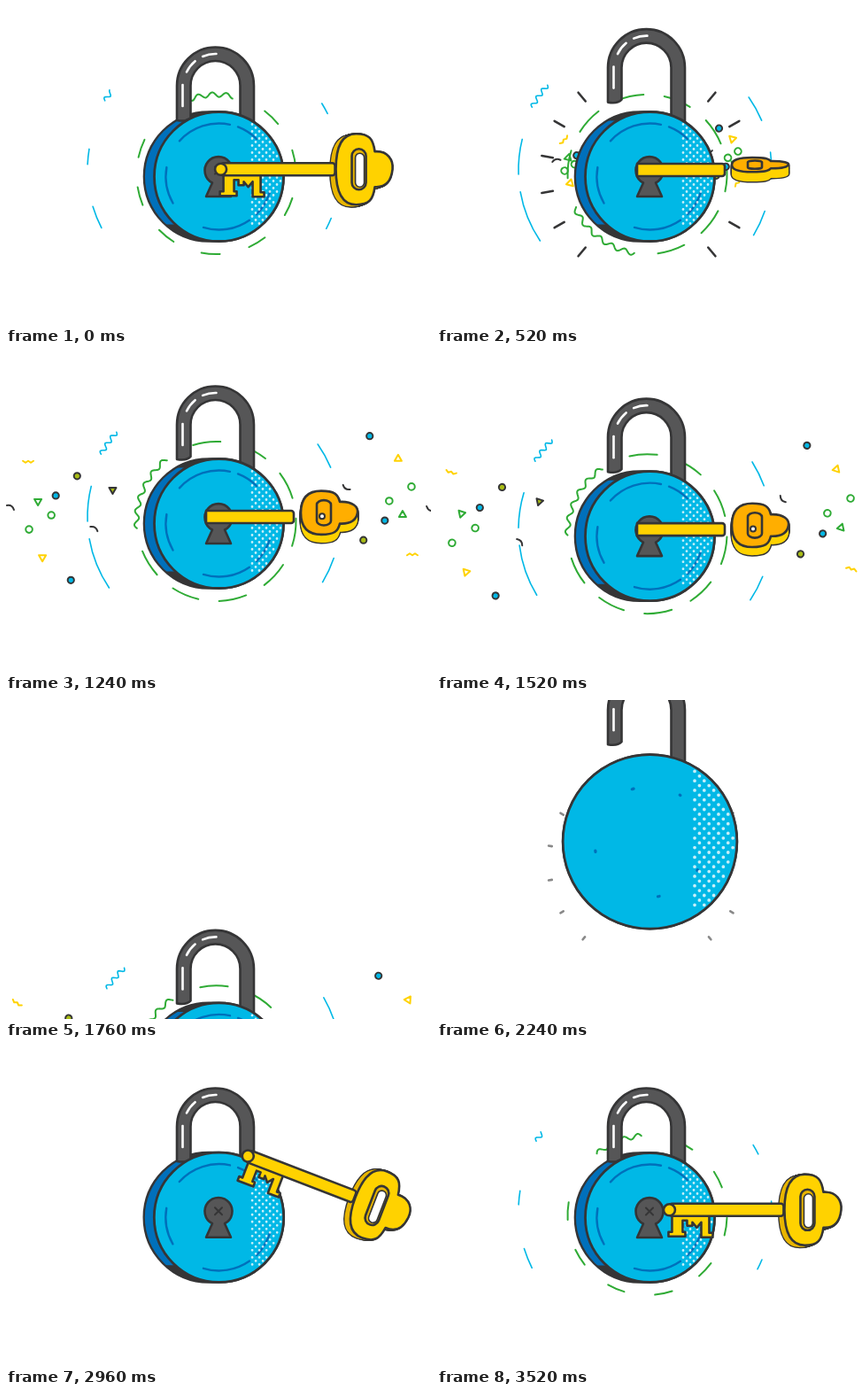
These frames come from a looping animation (480 by 360 pixels, 3.56 s). An HTML page with a canvas:

```html
<!DOCTYPE html>
<html>
<head>
<meta charset="utf-8">
<title>Padlock and key</title>
<style>
html, body { margin: 0; width: 100%; height: 100%; overflow: hidden; background: #fff; }
canvas { display: block; }
</style>
</head>
<body>
<canvas id="stage" width="480" height="360"></canvas>
<script>
const ctx = document.getElementById('stage').getContext('2d');
const LOOP = 3560, RAD = Math.PI / 180;
const INK = '#353536', STEEL = '#565657', CYAN = '#00b8e6', BLUE = '#0070bb';
const GREEN = '#2fab35', YELLOW = '#ffd200', SIDE = '#e8b500', ORANGE = '#ffae00', OLIVE = '#a9bd14';

const ramp = (t, from, to) => Math.min(1, Math.max(0, (t - from) / (to - from)));
const smooth = (t, from, to) => {
  const p = ramp(t, from, to);
  return p * p * (3 - 2 * p);
};

function paint(path, fill, line = INK, width = 2.6) {
  if (fill) { ctx.fillStyle = fill; ctx.fill(path); }
  if (line) { ctx.strokeStyle = line; ctx.lineWidth = width; ctx.stroke(path); }
}

function disc(x, y, r, fill, line, width) {
  const p = new Path2D();
  p.arc(x, y, r, 0, 7);
  paint(p, fill, line, width);
}

// Arc given by its middle and half its span, in degrees.
function dash(x, y, r, mid, half, color, width = 2) {
  const p = new Path2D();
  p.arc(x, y, r, (mid - half) * RAD, (mid + half) * RAD);
  paint(p, null, color, width);
}

function wave(x, y, r, mid, half, period, color, width = 2) {
  const p = new Path2D();
  for (let a = -half; a <= half; a += 0.5) {
    const d = r + 2.6 * Math.sin((a + half) / period * 2 * Math.PI);
    p.lineTo(x + d * Math.cos((mid + a) * RAD), y + d * Math.sin((mid + a) * RAD));
  }
  paint(p, null, color, width);
}

function rings(u) {
  const green = ramp(u, -300, 520) ** 0.4;
  if (green > 0) {
    const lead = 237 - 331 * Math.exp(-((Math.max(u + 40, 0) / 431) ** 1.275));
    for (let i = 0; i < 8; i++) dash(237.5, 190, 90, lead + 32 + 35 * i, 10 * green, GREEN);
    wave(237.5, 190, 90, lead - 28 * green, 28 * green, 10, GREEN);
  }
  const blue = ramp(u, -400, 520);
  if (blue > 0) {
    const drift = 5 * smooth(u, 1240, 1760);
    for (let i = -1; i < 2; i++) {
      dash(235, 185, 143, 27 * i - 2 + drift, 6 * blue, CYAN, 1.6);
      if (i < 1) dash(235, 185, 143, 186 + 28 * i + drift, (8 - 4 * i) * blue, CYAN, 1.6);
    }
    wave(235, 185, 146, -145 + drift, 6 * blue, 4, CYAN, 1.6);
  }
}

function ticks(age, cy, scale, color) {
  const p = ramp(age, 0, 280);
  if (p === 0 || p === 1) return;
  const inner = scale * (120 - 38 * (1 - p) ** 2), outer = inner + scale * 13 * Math.sin(Math.PI * p);
  const path = new Path2D();
  for (let a = 50; a <= 310; a += 20) {
    if (a === 70 || a === 90 || a === 110 || a === 250 || a === 270 || a === 290) continue;
    const c = Math.cos(a * RAD), s = Math.sin(a * RAD);
    path.moveTo(237 + inner * c, cy + inner * s);
    path.lineTo(237 + outer * c, cy + outer * s);
  }
  // The key side only has the two steeper pairs.
  for (const a of [-30, 30]) {
    const c = Math.cos(a * RAD), s = Math.sin(a * RAD);
    path.moveTo(237 + inner * c, cy + inner * s);
    path.lineTo(237 + outer * c, cy + outer * s);
  }
  paint(path, null, color);
}

// One half of the burst, around its centre; the other half is turned by 180 degrees.
const confetti = [
  ['squiggle', -216, -52, YELLOW], ['triangle', -205, -7, GREEN], ['triangle', -200, 56, YELLOW],
  ['triangle', -121, -20, INK], ['curl', -236, -1, INK], ['curl', -142, 23, INK],
  ['ring', -190, 8, GREEN], ['ring', -215, 24, GREEN],
  ['dot', -185, -14, CYAN], ['dot', -161, -36, OLIVE], ['dot', -168, 81, CYAN]
];
const shapes = {
  squiggle: new Path2D('M-6-1l3 2 3-2 3 2 3-2'),
  triangle: new Path2D('M-4-3H4L0 4Z'),
  curl: new Path2D('M-4-2Q2-3 4 3')
};

function burst(u) {
  const spread = 1.08 * (1 - 0.58 * Math.exp((520 - u) / 341));
  if (spread < 0) return;
  for (const side of [0, Math.PI]) for (const [kind, x, y, color] of confetti) {
    ctx.save();
    ctx.translate(242, 175);
    ctx.rotate(side);
    ctx.translate(x * spread, y * spread);
    ctx.rotate((u - 1240) / 900);
    if (kind === 'dot') disc(0, 0, 3.6, color, INK, 2);
    else if (kind === 'ring') disc(0, 0, 3.8, null, color, 2);
    else paint(shapes[kind], kind === 'triangle' && color === INK ? OLIVE : null, color, 2);
    ctx.restore();
  }
}

function shackle(up) {
  ctx.save();
  ctx.translate(0, -up);
  paint(new Path2D('M193 90a43.5 43.5 0 0 1 87 0V160H264.5V90a28 28 0 0 0-56 0V126Q204 131 193 129Z'), STEEL);
  paint(new Path2D('M199.5 89V113'), null, '#fff');
  for (const mid of [-142, -101]) dash(236.5, 90, 36, mid, 12.5, '#fff', 2.6);
  ctx.restore();
}

const halftone = new Path2D();
for (let col = 0; col < 10; col++) for (let row = 0; row < 15; row++) {
  const x = 37.5 + col * 4, y = -59 + row * 8 + col % 2 * 4;
  if (Math.hypot(x, y) < 70) {
    halftone.moveTo(x + 1.4, y);
    halftone.arc(x, y, 1.4, 0, 7);
  }
}

const keyhole = new Path2D('M-7 14A15.5 15.5 0 1 1 7 14L14 29.5H-14Z');
const cross = new Path2D('M-4-4L4 4M4-4L-4 4');

function lock(t, up) {
  const age = t - 2040, fresh = t > 1950;
  const scale = !fresh ? 1 : age < 0 ? 0 : 1 - Math.exp(-age / 190) * Math.cos(age * Math.PI / 200);
  const cy = 192.5 - 94 * (scale - 1), R = 73 * scale;
  const depth = fresh ? 11.5 * smooth(t, 2240, 2440) : 11.5;
  const hole = fresh ? smooth(t, 2260, 2480) : 1;
  const lines = fresh ? smooth(t, 2200, 2600) : 1;

  if (depth > 0) {
    const p = new Path2D();
    p.arc(240.5 - depth, cy, R, Math.PI / 2, -Math.PI / 2);
    p.arc(240.5, cy, R, -Math.PI / 2, Math.PI / 2);
    p.closePath();
    paint(p, INK);
    ctx.save();
    ctx.beginPath();
    ctx.rect(140, cy - 63, 100, 117);
    ctx.clip();
    disc(240.5 - depth, cy, R - 1, BLUE, null);
    ctx.restore();
  }
  shackle(up);
  if (scale <= 0) return;

  ctx.save();
  ctx.translate(240.5, cy);
  disc(0, 0, R, CYAN, null);
  ctx.save();
  ctx.scale(scale, scale);
  if (lines > 0) for (const [mid, half] of [[-108, 30], [-57, 12], [31, 14], [81, 26], [170, 20]]) {
    dash(0, 0, 46 + 14 * lines, mid, half * lines, BLUE, 2.4);
  }
  paint(halftone, 'rgba(255,255,255,.78)', null);
  ctx.restore();
  disc(0, 0, R, null, INK, 2.8);
  if (hole > 0) {
    ctx.translate(-0.5, -7);
    ctx.scale(hole, hole);
    paint(keyhole, STEEL);
    paint(cross, null, INK, 2);
  }
  ctx.restore();
}

const bowShape = new Path2D('M130 0C130-28 138-40 153-40S172-34 174-20C189-21 195-10 194 0S189 21 174 20C172 34 168 40 153 40S130 28 130 0Z');
const holeShape = new Path2D('M148-15a8 8 0 0 1 16 0V15a8 8 0 0 1-16 0Z');
const gapShape = new Path2D('M152-13a5 5 0 0 1 10 0V15a5 5 0 0 1-10 0Z');
const bits = new Path2D('M3 6V25H-1V30H18V25H15V12H20V18H26V14L31 20 36 14V31H49V26H45V6Z');

function bow(turn) {
  const c = Math.cos(turn * RAD), s = Math.sin(turn * RAD), depth = 8;
  const flat = (path, k = 0) => {
    const p = new Path2D();
    p.addPath(path, new DOMMatrix([
      1, 0, 0, Math.max(Math.abs(c), 0.03), -6 * Math.max(c, 0) * k, (2 + 9 * s) * k - 6 * s
    ]));
    return p;
  };
  const layers = Array.from({ length: depth }, (_, i) => flat(bowShape, 1 - i / depth));
  for (const p of layers) paint(p, null, INK, 3);
  for (const p of layers) paint(p, c > 0.5 ? SIDE : YELLOW, null);
  paint(flat(bowShape), c < 0 ? ORANGE : YELLOW);
  paint(flat(holeShape), c < 0 ? ORANGE : SIDE);
  if (c > 0.3) paint(flat(gapShape), '#fff', INK, 1.6);
  else if (c < -0.4) disc(154, 4 - 6 * s, 3, '#fff', INK, 2);
}

function key(t, u) {
  const v = u < 0 ? t : t + LOOP;
  const p = ramp(v, 2420, 3400), away = (1 - p) ** 1.5;
  const thrust = smooth(v, 3390, 3690);
  const turn = 128 * smooth(u, 110, 690);
  ctx.save();
  if (u >= 0) {
    ctx.beginPath();
    ctx.rect(225, -400, 300, 1200);
    ctx.clip();
  }
  ctx.translate(303 + 220 * away - 97 * Math.sin(Math.PI * p) - 100 * thrust, 183 - 200 * away + 2 * thrust);
  ctx.rotate(70 * away * RAD);
  if (turn < 45) bow(turn);
  if (u < 100) paint(bits, YELLOW);
  const shaft = new Path2D();
  shaft.roundRect(0, -7, turn < 45 ? 129 : 122, 14, 3);
  paint(shaft, YELLOW);
  if (u < 100) disc(0, 0, 6.5, YELLOW, INK, 2.6);
  if (turn >= 45) bow(turn);
  ctx.restore();
  if (u > 100) paint(new Path2D('M226 178V192'), null, INK);
}

// Distance the shackle stands above its closed position.
function lift(t) {
  if (t > 1950) return 230 * (1 - ramp(t, 2100, 2440)) ** 2;
  const x = Math.max(t - 440, 0), a = x * Math.PI / 180;
  return 9 + Math.exp(-x / 140) * (22 * Math.sin(a) - 9 * Math.cos(a));
}

function draw(t) {
  const u = t < 1950 ? t : t - LOOP;
  ctx.fillStyle = '#fff';
  ctx.fillRect(0, 0, 480, 360);
  ctx.lineCap = ctx.lineJoin = 'round';
  ctx.save();
  if (u > 1440) ctx.translate(0, 221 * ((u - 1440) / 320) ** 2);
  rings(u);
  burst(u);
  ticks(t - 400, 190, 1, INK);
  ticks(t - 1990, 184, 0.91, '#888');
  lock(t, lift(t));
  if (u >= 0 || t > 2420) key(t, u);
  ctx.restore();
}

function frame() {
  draw(performance.now() % LOOP);
  requestAnimationFrame(frame);
}
frame();
</script>
</body>
</html>
```
